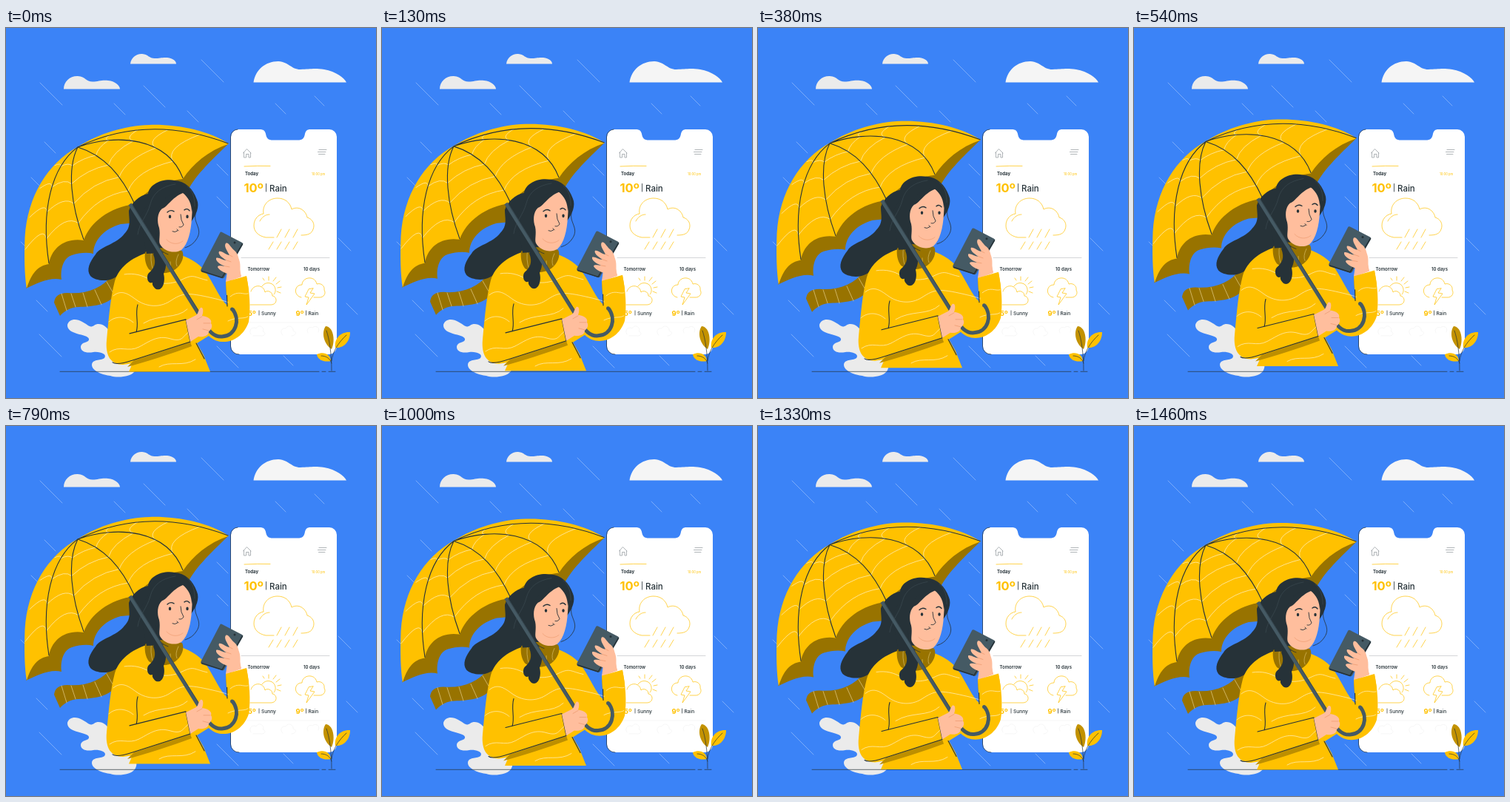
An HTML page for the animation above (1500 ms loop, 500 by 500 pixels).

```html
<!DOCTYPE html>
<html lang="en">
<head>
<meta charset="utf-8">
<title>Rainy day</title>
<style>
  html, body { margin: 0; width: 100%; height: 100%; overflow: hidden; background: #3b83f7; }
  svg { display: block; width: 100vw; height: 100vh; }
  text { font-family: Inter, "Open Sans", sans-serif; font-weight: 600; fill: #263238; font-size: 6px; }
  .line { fill: none; stroke-linecap: round; stroke-linejoin: round; }
  .y { fill: #ffc100; }
  .gold { fill: #987300; }
  .ink { fill: #263238; }
  .skin { fill: #ffbe9d; }
  .dark { stroke: #263238; }
  .pale { stroke: #fff3cb; stroke-width: .7; }
  .amber { stroke: #ffc100; stroke-width: .7; }
</style>
</head>
<body>
<svg viewBox="0 0 500 500">
  <rect width="500" height="500" fill="#3b83f7"/>

  <path id="rain" class="line" stroke="#a9c8fb" stroke-width=".6"/>

  <!-- clouds -->
  <path fill="#ebebeb" d="M78 82.500C78 72 87 64.500 97 65C108 66 108 72.500 117 72.500C125 72.500 129 70 138 71C148 72 154 78 154 82.500Z"/>
  <path fill="#ebebeb" d="M168 48.500C169 40 176 34.500 184 35C193 36 193 41 201 41C208 41 211 39.500 218 40C226 41 230 45 230 48.500Z"/>
  <path fill="#f5f5f5" d="M334.500 73.500C337 57 350 45 368 45C383 46 385 56 398 56C410 56 415 54 430 56C446 59 457 67 460 73.500Z"/>

  <!-- foliage on the left -->
  <path fill="#ebebeb" d="M83 401C85 393 95 392 103 397C111 401 113 406 119 402C126 397 136 402 141 412L164 444C174 446 180 455 174 464C168 472 150 473 141 470C132 469 116 464 116 455C117 447 127 450 133 446C137 441 128 437 118 438C108 440 101 437 101 431C102 423 113 426 112 420C110 413 82 415 83 401Z"/>

  <!-- weather app -->
  <g id="screen">
    <path id="case" fill="#fff" d="M314 137H343C348 137 350 139 351 143C352 149 354 151.500 361 151.500H394C401 151.500 403 149 404 143C405 139 407 137 411 137H437A10 10 0 0 1 447 147V430A11 11 0 0 1 436 441H315A11 11 0 0 1 304 430V147A10 10 0 0 1 314 137Z"/>
    <path class="line dark" stroke-width=".7" d="M313 137A10 10 0 0 0 303.500 147V430A11 11 0 0 0 315 441"/>
    <path class="line" stroke="#8d9498" stroke-width=".7" d="M320.500 169L325.500 163.500L331 169M321.500 168V175H324.500V170.500H328V175H330.500V168.500M423 164.500H433M421.500 167.500H432M422.500 170.500H431"/>
    <path class="line amber" d="M322 187Q340 186 357 186.500"/>
    <text x="323" y="199" style="font-weight:700">Today</text>
    <text x="413" y="199" style="font-size:4.200px;font-weight:400;fill:#ffc100">10:00 pm</text>
    <text x="321.500" y="222" style="font-size:16.500px;font-weight:700;fill:#ffc100">10º</text>
    <path class="line dark" stroke-width=".8" d="M351.500 210.500V221"/>
    <text x="356" y="220.500" style="font-size:11.500px;font-weight:500">Rain</text>

    <g class="line amber">
      <path d="M362 283H351C341 281 335 275 335 267C335 258 341 252 348 251C346 239 355 230 367 230C377 230 384 236 386 245C395 240 405 246 407 256C414 258 418 265 415 272C413 278 408 280 399 280M343 261C346 255 351 252 356 252"/>
      <path d="M372 272L366 283M383 272L377 283M394 272L388 283M361 289L355 299M372 289L366 299M383 289L377 299M394 289L388 299"/>
    </g>
    <path class="line" stroke="#c9ccce" stroke-width=".8" d="M318 310.500H437"/>
    <text x="326.500" y="327.500">Tomorrow</text>
    <text x="402" y="327.500">10 days</text>

    <g class="line amber">
      <path d="M330 374H358C367 374 367 363 360 362C360 356 353 354 350 357C348 346 334 346 331 356"/>
      <path d="M346 349C349 344 356 343 361 347C365 351 365 357 362 360M355 341V336M361 342L365 337M365 346L370 342M367 351L372 350M366 356L371 358M349 341L347 338"/>
      <path d="M399 364C393 363 390 357 392 352C393 349 396 347 400 347C400 341 406 337 412 338C417 339 419 342 420 346C426 344 431 349 430 354C433 359 429 364 424 364L416 364"/>
      <path d="M409 353L404 363L409 364L406 374L417 359L411 358L415 352Z"/>
    </g>
    <text x="323" y="388.500" style="font-size:9.500px;font-weight:700;fill:#ffc100">15º</text>
    <text x="391.500" y="388.500" style="font-size:9.500px;font-weight:700;fill:#ffc100">9º</text>
    <path class="line dark" stroke-width=".7" d="M342 382V388M405.500 382V388"/>
    <text x="345" y="388" style="font-size:6.600px;font-weight:500">Sunny</text>
    <text x="408.500" y="388" style="font-size:6.600px;font-weight:500">Rain</text>
    <path class="line" stroke="#f3f3f3" stroke-width=".7" d="M318 398H437M331 414C327 408 333 403 338 406C342 399 350 405 347 410C353 412 349 417 344 416H334M374 415C369 410 373 405 378 406C381 400 389 404 388 409C394 411 391 416 386 416M408 412C405 407 410 403 414 405C419 401 425 405 422 411"/>
  </g>

  <!-- plant on the right -->
  <path fill="#c39200" d="M440 434C429 427 426 411 432 403C441 403 446 420 440 434Z"/>
  <path class="y" d="M445 432C443 419 453 410 465 411C465 423 457 433 445 432Z"/>
  <path class="y" d="M439 450C431 452 421 449 420 441C429 437 438 440 439 450Z"/>
  <path class="line dark" stroke-width=".7" d="M433 409C437 420 440 440 440 463M460 415C449 425 441 438 440 450M426 443C432 443 438 446 440 453"/>

  <path class="line dark" stroke-width=".7" d="M73 464.300H423M427 464.300H432M436 464.300H445"/>

  <g id="walker">
    <!-- umbrella canopy -->
    <path class="gold" d="M27 352C42 345 60 336 75 340C73 323 79 310 89 307C99 304 109 303 118 305C118 287 133 271 155 265L188 262L244 224C252 203 276 180 301 156L210 150L70 250Z"/>
    <path class="y" d="M301 156.500C274 139 233 130 194 131C160 132 125 143 98 160C56 183 29 227 25.500 283C24.500 310 25 335 28 352C34 332 43 321 58 319C61 299 78 283 105 287C113 263 140 242 174 238C187 222 209 207 239 204C252 184 273 166 301 156.500Z"/>
    <path id="bands" class="line pale"/>
    <path id="ribs" class="line dark" stroke-width="1.100"/>

    <!-- scarf tail -->
    <path class="gold" d="M65 371C66 363 71 358 83 358C109 360 130 352 144 333C156 315 173 307 191 303L201 328C181 333 165 341 151 358C137 376 115 376 98 377C88 377 79 382 73 389Z"/>
    <path class="line" stroke="#e5cf8c" stroke-width=".7" d="M75 359L82 382M88 359L94 377M104 358L110 377M120 354L129 374M136 343L147 362M148 328L161 347M164 314L175 334M180 307L187 329"/>

    <!-- hair behind -->
    <path class="ink" d="M228 206C211 203 194 211 192 224C180 226 169 237 166 247C166 259 170 268 160 278C150 292 127 295 121 306C113 316 108 327 114 335C121 343 148 345 154 329C160 318 176 314 189 306L206 332L236 300L250 262C257 253 262 241 258 232C252 216 242 207 228 206Z"/>

    <!-- coat -->
    <path class="y" d="M190 304C169 311 153 323 147 342C141 365 139 391 136 422C134 443 142 455 158 455L171 453L166 464.500H276L267 442L258 426L274 416C290 432 319 424 328 397C331 379 329 354 325 336L297 344L299 375C289 366 282 348 272 333C265 320 250 312 237 307Z"/>
    <path fill="#bd8f00" d="M164 458L173 449L249 424L251 430C222 441 189 451 164 458Z"/>
    <g class="line pale">
      <path d="M160 333C173 331 184 334 194 340S222 348 238 340S254 337 272 341"/>
      <path d="M145 362C157 352 167 361 177 368S205 380 222 369S244 357 279 365S294 372 300 370"/>
      <path d="M139 397C149 388 163 390 172 398M186 399C207 386 230 394 245 380M140 438C154 428 165 439 180 431S205 415 222 420S238 417 247 411M207 458C222 449 239 459 256 448M303 363C314 354 320 361 327 359M300 396C312 390 321 394 327 390"/>
    </g>
    <path class="line dark" stroke-width="1.100" d="M178 374C174 388 180 399 176 411M167 413L243 394L249 424L171 449C159 453 148 455 144 452M298 344L299 376M257 426L268 447"/>

    <!-- collar and hanging lock -->
    <path class="gold" d="M188 303C196 297 212 296 222 299L238 301C242 309 237 320 229 326C218 334 202 332 193 326C188 319 187 310 188 303Z"/>
    <path class="line" stroke="#d9bd66" stroke-width=".7" d="M197 301Q194 313 199 328M210 310Q208 321 213 329M222 316Q222 323 223 328M233 306Q228 316 231 322"/>
    <path class="ink" d="M202 298C217 307 219 320 213 332C216 344 211 356 203 353C200 351 197 347 198 344C191 347 189 335 193 331C200 325 204 318 199 306Z"/>

    <!-- face -->
    <path class="skin" d="M239 223C224 229 217 243 211 244C204 250 204 262 207 270C209 280 206 287 208 292C214 303 229 305 237 300C246 292 250 275 251 257C253 239 251 226 239 223Z"/>
    <path class="ink" d="M238 222C229 221 216 226 208 240C199 256 209 264 203 276C201 289 205 297 213 304L190 305L181 256L198 225L226 207L250 218C255 225 253 242 251 249C251 238 247 229 238 222Z"/>
    <path class="line dark" stroke-width=".8" d="M256 252C253 264 267 272 257 286Q252 294 242 297M205 278C199 290 207 302 219 306"/>
    <path class="line" stroke="#3f4d54" stroke-width=".6" d="M229 211C211 214 199 222 195 238S180 263 178 279M245 214C253 220 255 231 255 241"/>
    <g class="ink">
      <ellipse cx="221.500" cy="255" rx="1.700" ry="2.300"/>
      <ellipse cx="245" cy="255" rx="1.700" ry="2.300"/>
    </g>
    <path class="line dark" stroke-width="1.400" d="M218 249Q222 245 227 248M241 246Q245 243 248 247"/>
    <path class="line dark" stroke-width=".9" d="M236 252Q236 260 240 266Q238 270 234 269M225 275Q228 277 232 274M231 272L233 274"/>
    <path class="line" stroke="#eb996e" stroke-width=".6" d="M217 286C223 293 233 293 239 288"/>

    <!-- umbrella handle -->
    <path class="line" stroke="#455a64" stroke-width="5" style="stroke-linecap:butt" d="M167.500 238L267 397C275 413 283 418 292 417C311 416 317 394 306 380"/>
    <path class="line" stroke="#324048" stroke-width=".7" d="M171 240L264 388"/>
    <circle cx="305.500" cy="380" r="2.500" fill="#455a64"/>

    <!-- hand on the handle -->
    <path class="skin" d="M243 395L257 388C260 386 260 380 263 378C267 377 267 384 265 389C273 390 279 394 277 399C280 403 277 408 274 410C274 416 267 418 260 417L249 424Z"/>
    <path class="line" stroke="#eb996e" stroke-width=".7" d="M265 390L258 394M276 399L267 399M274 409L266 407"/>

    <!-- phone in hand -->
    <path class="skin" d="M297 343L299 329L307 303L315 313C318 321 315 327 318 336Z"/>
    <path fill="#455a64" d="M292 276L319 290Q321 291 320 293L295 337Q294 339 291 338L265 330Q262 328 264 325L289 277Q290 275 292 276Z"/>
    <path class="line dark" stroke-width="1.500" d="M264.500 328.500L292 337.500L319.500 292"/>
    <circle class="ink" cx="309" cy="290" r="1.500"/>
    <path class="skin" d="M297 344L300 332C294 331 287 326 286 323C287 320 292 322 296 322C290 320 283 315 284 311C287 309 292 314 298 314C291 310 286 305 288 302C292 301 297 307 302 307C299 301 294 295 297 291C301 289 304 298 309 301C314 305 316 315 315 322L318 336Z"/>
    <path class="line" stroke="#eb996e" stroke-width=".7" d="M296 322L302 323M298 314L304 316M302 307L306 309"/>
    <path class="y" d="M297 343L325 335L328 354L298 361Z"/>
  </g>
</svg>
<script>
  const LOOP = 1500, LEAD = 50, RISE = 8.4;
  const byId = id => document.getElementById(id);
  const setPath = (id, parts) => byId(id).setAttribute("d", parts.join(""));

  // x, y and length of each diagonal drop
  const drops = [
    [46, 74, 30], [146, 102, 15], [186, 78, 29], [264, 43, 30], [245, 112, 15],
    [52, 154, 15], [364, 102, 14], [417, 92, 13], [285, 184, 15], [34, 202, 11],
    [285, 228, 15], [449, 284, 17], [460, 372, 15], [41, 368, 15], [45, 414, 30],
    [283, 290, 16], [285, 430, 29], [375, 443, 13], [20, 289, 8]
  ];
  setPath("rain", drops.map(([x, y, n]) => `M${x} ${y}l${n} ${n}`));

  // Canopy ribs, as cubic curves from the apex; the first is the outer edge
  const apex = [97, 161];
  const ribs = [
    [52, 183, 18, 252, 27, 340],
    [61, 188, 47, 247, 58, 318],
    [82, 190, 88, 240, 105, 286],
    [133, 172, 156, 199, 174, 238],
    [150, 142, 218, 148, 239, 203],
    [151, 135, 218, 125, 300, 156]
  ];
  setPath("ribs", ribs.slice(1).map(r => `M${apex}C${r}`));

  const along = (r, t) => apex.map((a, i) => {
    const u = 1 - t;
    return u * u * u * a + 3 * u * u * t * r[i] + 3 * u * t * t * r[i + 2] + t * t * t * r[i + 4];
  });

  // Scalloped stitching between neighbouring ribs, bowed towards the apex
  const bands = [];
  for (const t of [.25, .45, .65, .84]) {
    for (let k = 1; k < ribs.length; k++) {
      const p = along(ribs[k - 1], t), q = along(ribs[k], t);
      const bow = apex.map((a, i) => .8 * (p[i] + q[i]) / 2 + .2 * a);
      bands.push(`M${p}Q${bow} ${q}`);
    }
  }
  setPath("bands", bands);

  const start = performance.now();

  function draw(now) {
    const turn = (Math.max(0, now - start) + LEAD) / LOOP * 2 * Math.PI;
    const lift = RISE * (1 - Math.cos(turn)) / 2;
    byId("walker").setAttribute("transform", `translate(0 ${-lift.toFixed(3)})`);
    requestAnimationFrame(draw);
  }
  draw(start);
</script>
</body>
</html>
```
